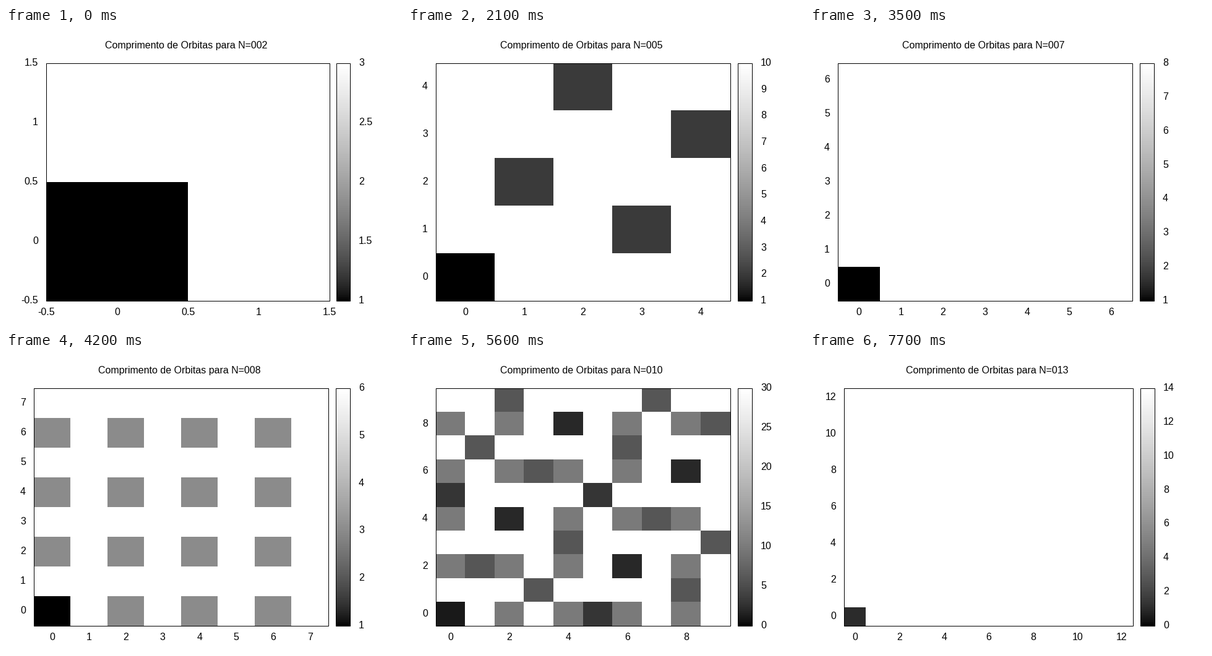
Recreate the animation shown at these times as a matplotlib script. Size 640 px wide and 480 px high, loop 8 s.

```python
import math

import matplotlib.pyplot as plt
import numpy as np
from matplotlib.animation import FuncAnimation
from matplotlib.patches import Rectangle

W, H, DPI = 640, 480, 100
PX = 72 / DPI
TOP, BOTTOM = 57, 441
FIRST_N = 2
STEP_MS, TICK_MS, LOOP_MS = 700, 100, 8000
BANDS = 128
FONT = dict(family="Liberation Sans", size=16 * PX, color="black")

# widest y label -> plot left, plot right, bar left, bar right
LAYOUT = {1: (45, 521, 533, 556), 2: (55, 522, 534, 557), 4: (65, 523, 534, 556)}

fig = plt.figure(figsize=(W / DPI, H / DPI), dpi=DPI, facecolor="white")
ax = fig.add_axes([0, 0, 1, 1])


def orbit_lengths(n):
    """Orbit length of every point of the n x n torus under the cat map."""
    y0, x0 = np.mgrid[0:n, 0:n]
    x, y = x0, y0
    length = np.zeros((n, n), int)
    k = 0
    while (length == 0).any():
        x, y = (2 * x + y) % n, (x + y) % n
        k += 1
        length[(length == 0) & (x == x0) & (y == y0)] = k
    return length


def tick_step(span):
    power = 10 ** math.floor(math.log10(span))
    density = 20 * power / span
    for limit, step in ((40, 0.05), (20, 0.1), (10, 0.2), (4, 0.5), (2, 1)):
        if density > limit:
            return step * power
    return 2 * power


def ticks(lo, hi):
    step = tick_step(hi - lo)
    first, last = math.ceil(lo / step), math.floor(hi / step)
    return [k * step for k in range(first, last + 1)]


def shade(level):
    """Gray palette with gamma 1.5, quantised to the bar's bands."""
    q = np.minimum(np.floor(np.asarray(level) * BANDS), BANDS - 1) / (BANDS - 1)
    return q ** (1 / 1.5)


def mesh(xs, ys, gray):
    ax.pcolormesh(xs, ys, gray, cmap="gray", vmin=0, vmax=1,
                  antialiased=False, snap=True)


def frame(left, right):
    # half-pixel offset puts the 1 px line exactly on one pixel row
    ax.add_patch(Rectangle((left + 0.5, TOP + 0.5), right - left, BOTTOM - TOP,
                           fill=False, ec="black", lw=PX, snap=False, zorder=2))


def label(x, y, text, ha):
    ax.text(x, y, text, ha=ha, va="baseline", **FONT)


def draw(i):
    n = FIRST_N + i * TICK_MS // STEP_MS
    ax.clear()
    ax.set(xlim=(0, W), ylim=(H, 0))
    ax.axis("off")

    lo, hi = -0.5, n - 0.5
    marks = ticks(lo, hi)
    left, right, bar_l, bar_r = LAYOUT[max(len(f"{t:g}") for t in marks)]

    lengths = orbit_lengths(n)
    step = tick_step(lengths.max() - 1)
    c_lo = math.floor(1 / step) * step
    c_hi = math.ceil(lengths.max() / step) * step

    edges = np.arange(n + 1) / n
    mesh(np.floor(left + edges * (right - left)),
         np.floor(BOTTOM - edges * (BOTTOM - TOP)),
         shade((lengths - c_lo) / (c_hi - c_lo)))
    mesh([bar_l, bar_r], np.linspace(BOTTOM, TOP, BANDS + 1),
         shade((np.arange(BANDS) + 0.5) / BANDS)[:, None])
    frame(left, right)
    frame(bar_l, bar_r)

    for t in marks:
        f = (t - lo) / n
        label(left + f * (right - left), 464, f"{t:g}", "center")
        label(left - 13, round(BOTTOM - f * (BOTTOM - TOP)) + 4, f"{t:g}", "right")
    for t in ticks(c_lo, c_hi):
        f = (t - c_lo) / (c_hi - c_lo)
        label(bar_r + 14, round(BOTTOM - f * (BOTTOM - TOP)) + 4, f"{t:g}", "left")
    label((left + right) / 2 - 2.5, 33, f"Comprimento de Orbitas para N={n:03d}", "center")
    return []


anim = FuncAnimation(fig, draw, frames=LOOP_MS // TICK_MS, interval=TICK_MS,
                     init_func=lambda: [], repeat=True, repeat_delay=0)
plt.show()
```
